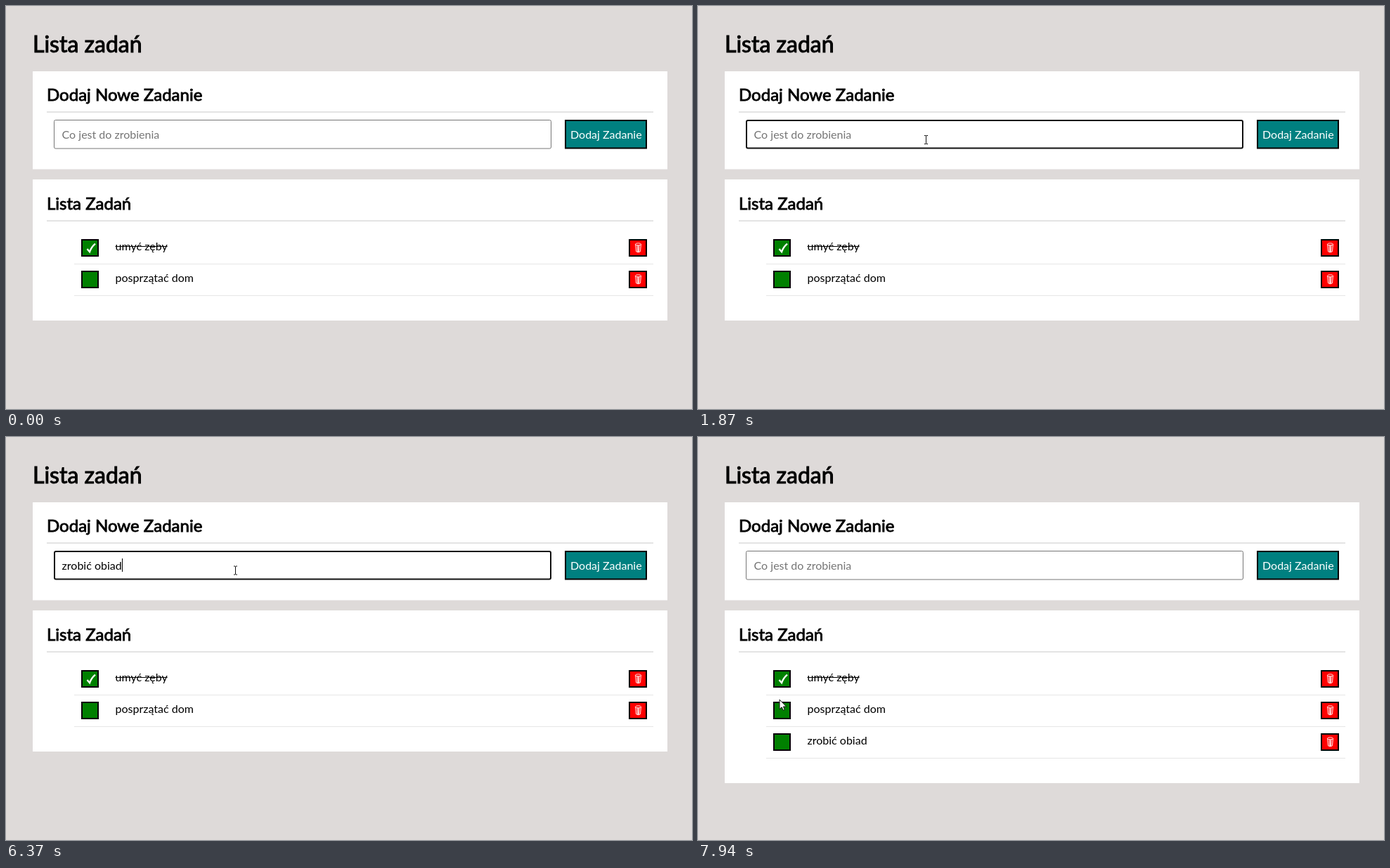
An HTML page with a canvas for the animation above (8 s loop, 976 px wide and 574 px high).

```html
<!DOCTYPE html>
<html lang="pl">
<head>
<meta charset="utf-8">
<title>Lista zadań</title>
<style>
  html, body { margin: 0; width: 100%; height: 100%; overflow: hidden; background: #dedad9; }
  #stage { position: relative; width: 976px; height: 574px; overflow: hidden; }
  canvas { position: absolute; left: 0; top: 0; }
  span { position: absolute; white-space: pre; color: #000; font: 400 16px Lato, sans-serif; }
  .h1 { font-size: 32px; -webkit-text-stroke: 1px #000; }
  .h2 { font-size: 24px; -webkit-text-stroke: 0.86px #000; }
  .done { text-decoration: line-through; }
  .light { color: #fff; }
</style>
</head>
<body>
<div id="stage"></div>
<script>
const LOOP = 8000;
const W = 976, H = 574;
const stage = document.getElementById('stage');

function addCanvas() {
  const c = document.createElement('canvas');
  c.width = W;
  c.height = H;
  stage.append(c);
  return c.getContext('2d');
}

// Places text by its left edge and baseline.
function addText(text, x, baseline, size = 16, cls = '') {
  const s = document.createElement('span');
  s.textContent = text;
  s.className = cls;
  s.style.left = x + 'px';
  s.style.top = baseline - size + 'px';
  stage.append(s);
  return s;
}

const page = addCanvas();
addText('Lista zadań', 38, 66, 32, 'h1');
addText('Dodaj Nowe Zadanie', 58, 135, 24, 'h2');
addText('Lista Zadań', 58, 290, 24, 'h2');
addText('Dodaj Zadanie', 803, 189, 16, 'light');
addText('umyć zęby', 155.5, 348, 16, 'done');
addText('posprzątać dom', 155.5, 393);
const newTask = addText('zrobić obiad', 155.5, 438);
const field = addText('', 79.6, 189);
const top2d = addCanvas();

const TASK = 'zrobić obiad';
const HINT = 'Co jest do zrobienia';
const KEYS = [2270, 2530, 3080, 3410, 3870, 4260, 4530, 5190, 5520, 5650, 5780, 5910];
const CARET_OFF = [[1870, 2270], [5060, 5190], [6440, 6970]];
const HOVER = 950, FOCUS = 1350, PRESS = 7260, ADDED = 7330;

const within = (t, a, b) => t >= a && t < b;
const easeOut = p => 1 - (1 - p) ** 2;
const smooth = p => p * p * (3 - 2 * p);
const cubic = p => p < 0.5 ? 4 * p ** 3 : 1 - 4 * (1 - p) ** 3;

function rect(x, y, w, h, color) {
  page.fillStyle = color;
  page.fillRect(x, y, w, h);
}

function button(x, y, w, h, color) {
  rect(x, y, w, h, '#000');
  rect(x + 2, y + 2, w - 4, h - 4, color);
}

const tickPath = new Path2D('M115.5 346L119 350.2Q121.5 343 127 338.6');
const binPath = new Path2D('M-4 -5.2A4 1.5 0 1 1 4 -5.2A4 1.5 0 1 1 -4 -5.2' +
  'L-3 5.2Q0 7.4 3 5.2L4 -5.2M-1.6 -3.6L-1.2 6M1.6 -3.6L1.2 6M0 -3.6V6');

function row(y, done) {
  button(107, y, 25, 25, '#008000');
  button(886, y, 26, 25, '#ff0000');
  rect(97, y + 35, 824, 1, '#e6e6e6');
  page.strokeStyle = '#fff';
  if (done) {
    page.lineWidth = 2.4;
    page.stroke(tickPath);
  }
  page.save();
  page.translate(899.5, y + 12.5);
  page.lineWidth = 0.9;
  page.stroke(binPath);
  page.restore();
}

function inputBox(t) {
  const focused = within(t, FOCUS, PRESS);
  const lw = focused ? 2 : 1;
  page.beginPath();
  page.roundRect(68 + lw / 2, 162 + lw / 2, 708 - lw, 41.5 - lw, 2);
  page.lineWidth = lw;
  page.strokeStyle = focused ? '#101010' : within(t, HOVER, FOCUS) ? '#4f4f4f' : '#767676';
  page.stroke();

  const typed = t < ADDED ? TASK.slice(0, KEYS.filter(k => t >= k).length) : '';
  field.textContent = typed || HINT;
  field.style.color = typed ? '#000' : '#757575';
  if (focused && !CARET_OFF.some(([a, b]) => within(t, a, b))) {
    page.font = '16px Lato, sans-serif';
    rect(Math.floor(80 + page.measureText(typed).width), 173, 1, 19, '#000');
  }
}

function drawPage(t) {
  const added = t >= ADDED;
  rect(0, 0, W, H, '#dedad9');
  rect(38, 93, 903, 139.5, '#fff');
  rect(38, 247, 903, added ? 246 : 201, '#fff');
  rect(58, 150, 863, 2, '#e4e4e4');
  rect(58, 305, 863, 2, '#e4e4e4');
  button(795, 162, 117, 41.5, within(t, PRESS, ADDED) ? '#64e9e9' : '#008080');
  inputBox(t);
  row(332, true);
  row(377, false);
  if (added) row(422, false);
  newTask.style.visibility = added ? 'visible' : 'hidden';
}

const arrow = new Path2D('M0 0V13.6L3.2 10.8L5.2 15.3L7.3 14.4L5.4 10H9.6Z');
const hand = new Path2D('M-1.5 12V1.5Q-1.5 0 0 0T1.5 1.5V6.5Q3 5.5 4.3 7Q5.8 6.3 6.8 7.8' +
  'Q8.5 7.5 8.5 9.5V13Q8.5 15 7 17V19H-.5V17.5L-5 11.5Q-5.5 9.5 -4 9.2Q-2.8 9.5 -1.5 11Z');
const beam = new Path2D('M-2.5 -6H-.5L0 -5.5L.5 -6H2.5M0 -5.5V5.5M-2.5 6H-.5L0 5.5L.5 6H2.5');

// The pointer advances in even steps, from a to b.
function travel(t, start, end, steps, ease, a, b, first = 0) {
  const k = Math.floor((t - start + 1) / ((end - start) / (steps - 1))) + first;
  const p = ease(Math.min(1, k / (steps - 1 + first)));
  return [a[0] + (b[0] - a[0]) * p, a[1] + (b[1] - a[1]) * p];
}

const TEXT_SPOT = [324.5, 190.5], BUTTON_SPOT = [816.5, 178];

function pointer(t) {
  if (t < 130) return null;
  if (t < HOVER) return travel(t, 130, 880, 12, easeOut, [784.5, 499], [337.5, 211]);
  if (t < 1020) return [329.5, 198.5];
  if (t < 1540) return [325.5, 191.5];
  if (t < 6370) return TEXT_SPOT;
  if (t < 7600) return travel(t, 6370, 7130, 12, smooth, [326.5, 190], BUTTON_SPOT);
  return travel(t, 7600, 7940, 6, cubic, BUTTON_SPOT, [116, 374], 1);
}

function drawPointer(t) {
  top2d.clearRect(0, 0, W, H);
  const pos = pointer(t);
  if (!pos) return;
  const [x, y] = pos;
  top2d.save();
  if (within(t, 1280, FOCUS) || within(t, PRESS, ADDED)) {
    top2d.fillStyle = 'rgba(255,255,0,0.6)';
    top2d.beginPath();
    top2d.arc(x - 1.5, y, 11.8, 0, Math.PI * 2);
    top2d.fill();
  }
  top2d.translate(x, y);
  top2d.lineWidth = 1;
  top2d.strokeStyle = '#111';
  top2d.fillStyle = '#fff';
  const level = within(y, 162, 204);
  if (level && within(x, 68, 776)) {
    top2d.stroke(beam);
  } else {
    const shape = level && within(x, 795, 912) ? hand : arrow;
    top2d.fill(shape);
    top2d.stroke(shape);
  }
  top2d.restore();
}

function frame() {
  const t = performance.now() % LOOP;
  drawPage(t);
  drawPointer(t);
  requestAnimationFrame(frame);
}
frame();
</script>
</body>
</html>
```
